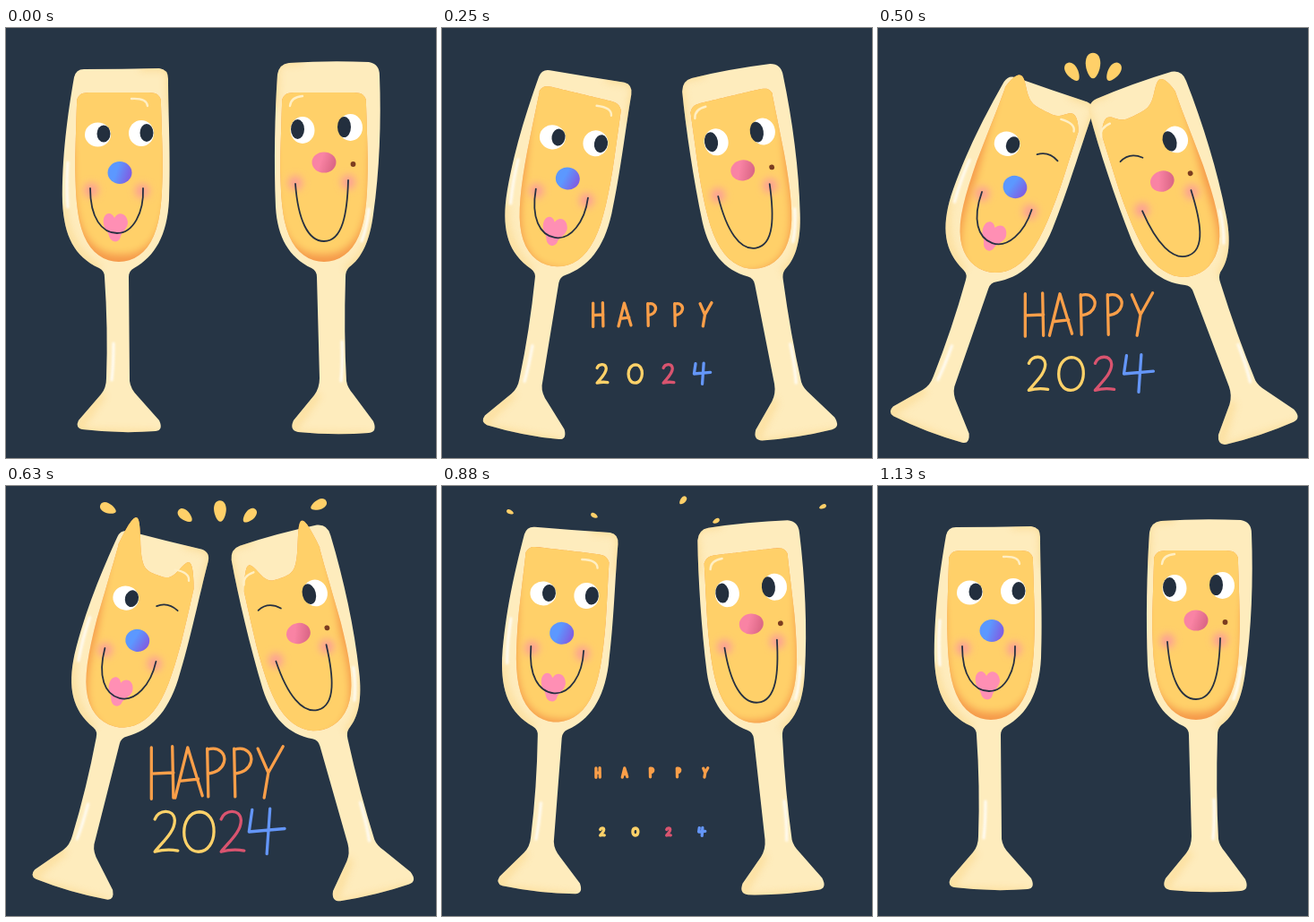
Animation of 480 by 480 pixels, one loop 1260 ms. Source, as an HTML page:

```html
<!DOCTYPE html>
<html lang="en">
<head>
<meta charset="utf-8">
<title>Happy 2024</title>
<style>
  html, body { margin: 0; width: 100%; height: 100%; overflow: hidden; background: #263545; }
  svg { display: block; width: 100vw; height: 100vh; }
  .line { fill: none; stroke: #263041; stroke-width: 1.8; stroke-linecap: round; }
  .shine { fill: none; stroke: #fff; stroke-width: 3; stroke-linecap: round; opacity: .85; }
  .glow { fill: none; stroke: #f9cc70; stroke-width: 8; opacity: .45; }
  .rim { fill: none; stroke: #ffefc4; stroke-width: 2.4; stroke-linecap: round; }
  .glass { fill: #feecbd; }
  .amber { fill: #f5994a; }
  .liquid, .drop { fill: #ffd069; }
  .dark { fill: #232f3e; }
  .white { fill: #fff; }
  .cheek { fill: #fb8fa5; opacity: .75; }
  #lettering path { fill: none; stroke-linecap: round; stroke-linejoin: round; }
</style>
</head>
<body>
<svg viewBox="0 0 480 480" role="img" aria-label="Two champagne glasses clink: Happy 2024">
  <defs>
    <filter id="soft" x="-50%" y="-50%" width="200%" height="200%"><feGaussianBlur stdDeviation="4"/></filter>
    <filter id="fine" x="-300%" y="-20%" width="700%" height="140%"><feGaussianBlur stdDeviation=".9"/></filter>
    <linearGradient id="blue" y2=".3">
      <stop offset=".45" stop-color="#5c98ff"/><stop offset="1" stop-color="#7d62e4"/>
    </linearGradient>
    <linearGradient id="pink" y2=".3">
      <stop offset=".45" stop-color="#f983a4"/><stop offset="1" stop-color="#dd6887"/>
    </linearGradient>
    <clipPath id="bowlL"><path id="clipL"/></clipPath>
    <clipPath id="bowlR"><path id="clipR"/></clipPath>
    <path id="outlineL" d="M87 46 Q130 46 171 45 Q181 46 181 57 C181 95 184 145 182 192 C180 232 166 255 143 268
      Q137 271 137 278 L138 394 Q139 403 147 411 L171 438 Q176 449 167 450 Q126 453 85 448 Q77 446 81 438
      L106 409 Q112 402 112 391 Q114 335 110 278 Q110 271 104 268 C76 255 65 232 63 195 C62 145 69 95 76 55 Q78 46 87 46Z"/>
    <path id="outlineR" d="M316 39 Q360 36 405 38 Q417 40 417 53 C419 105 417 160 410 208 C406 238 397 257 383 267
      Q379 271 379 278 Q377 340 380 394 Q381 401 387 408 L410 439 Q415 451 405 452 Q366 455 326 451 Q316 449 321 438
      L344 410 Q350 402 350 391 L347 278 Q347 271 341 268 C316 256 303 234 301 200 C299 150 300 95 303 52 Q305 40 316 39Z"/>
    <clipPath id="bodyL"><use href="#outlineL"/></clipPath>
    <clipPath id="bodyR"><use href="#outlineR"/></clipPath>
  </defs>

  <g id="glassL">
    <use href="#outlineL" class="glass"/>
    <g clip-path="url(#bodyL)">
      <path class="glow" filter="url(#soft)" d="M150 44 L183 44 L184 90 M62 200 Q68 245 104 270 M78 450 L108 408 M80 452 L170 454"/>
    </g>
    <path class="shine" filter="url(#fine)" d="M69 150 Q67 175 69 200 M120 352 Q120 375 118 393"/>
    <path id="amberL" class="amber"/>
    <g clip-path="url(#bowlL)"><path id="lightL" class="liquid" filter="url(#soft)"/></g>
    <path id="rimL" class="rim" d="M140 79 Q157 78 158 87"/>
    <ellipse class="white" cx="102.5" cy="119" rx="14.5" ry="13.5"/>
    <ellipse class="dark" cx="109" cy="118" rx="7.5" ry="9.5"/>
    <g id="openL">
      <ellipse class="white" cx="151" cy="117.5" rx="14" ry="14.5"/>
      <ellipse class="dark" cx="157" cy="117" rx="7.5" ry="10"/>
    </g>
    <path id="winkL" class="line" d="M138 119 Q149 111 162 118"/>
    <g filter="url(#soft)">
      <circle class="cheek" cx="95" cy="181" r="8"/><circle class="cheek" cx="152" cy="182" r="8"/>
    </g>
    <ellipse cx="127" cy="161.5" rx="13.5" ry="12.5" fill="url(#blue)"/>
    <path fill="#ff8fb4" d="M109 219 C107 207 117 203 121 212 C125 204 135 206 136 217 C136 223 131 226 128 232 C127 241 117 240 115 232 C114 227 110 225 109 219Z"/>
    <path class="line" d="M94 179 C94 212 107 229 124 229 C142 229 154 206 153 179"/>
  </g>

  <g id="glassR">
    <use href="#outlineR" class="glass"/>
    <g clip-path="url(#bodyR)">
      <path class="glow" filter="url(#soft)" d="M300 90 L301 38 L330 36 M412 215 Q405 255 380 270 M318 450 L348 408 M322 455 L408 456"/>
    </g>
    <path class="shine" filter="url(#fine)" d="M405 202 Q403 222 397 238 M375 350 Q376 375 374 394"/>
    <path id="amberR" class="amber"/>
    <g clip-path="url(#bowlR)"><path id="lightR" class="liquid" filter="url(#soft)"/></g>
    <path id="rimR" class="rim" d="M317 87 Q318 77 331 76"/>
    <g id="openR">
      <ellipse class="white" cx="331" cy="114" rx="13.5" ry="15"/>
      <ellipse class="dark" cx="325.5" cy="113" rx="7.5" ry="11"/>
    </g>
    <path id="winkR" class="line" d="M318 114 Q331 107 343 118"/>
    <ellipse class="white" cx="384.5" cy="111" rx="13.5" ry="15"/>
    <ellipse class="dark" cx="377.5" cy="110.5" rx="7.5" ry="11.5"/>
    <g filter="url(#soft)">
      <circle class="cheek" cx="323" cy="173" r="8"/><circle class="cheek" cx="382" cy="172" r="8"/>
    </g>
    <ellipse cx="355" cy="150" rx="13.5" ry="11.5" fill="url(#pink)"/>
    <circle cx="387.5" cy="152" r="2.9" fill="#7b3d20"/>
    <path class="line" d="M323 174 C326 214 337 238 355 238 C376 238 381 206 382 170"/>
  </g>

  <g id="lettering"></g>
  <g id="drops"></g>
</svg>
<script>
const LOOP = 1260, STEP = 125, CLINK = 4, SPLASH = 5;
const $ = id => document.getElementById(id);
const svgPath = (attrs, parent) => {
  const el = document.createElementNS('http://www.w3.org/2000/svg', 'path');
  for (const key in attrs) el.setAttribute(key, attrs[key]);
  return parent.appendChild(el);
};
const show = (el, on) => { el.style.display = on ? '' : 'none'; };
const range = (from, to, count) => Array.from({ length: count + 1 }, (_, i) => from + (to - from) * i / count);
const polygon = pts => 'M' + pts.map(p => p.map(n => n.toFixed(1))).join('L') + 'Z';
const hump = (u, centre, width) => Math.exp(-(((u - centre) / width) ** 2));

// "out" points to the side of the bowl away from the other glass
const glasses = {
  L: { out: -1, mid: 126, pivot: [123, 270], drift: [-2.55, 2.1], turn: 4.9 },
  R: { out: 1, mid: 355, pivot: [363, 272], drift: [.5, 2.9], turn: -4.8 }
};
const TOP = 72, BOTTOM = 261;

function halfWidth(y) {
  const v = Math.max(0, (y - TOP) / (BOTTOM - TOP));
  return 49 * (.95 + .05 * Math.min(1, v * 2.5)) * Math.sqrt(Math.max(0, 1 - v ** 6));
}

// Both walls of the bowl, down the inner one and up the outer one
function walls({ out, mid }, innerTop, outerTop, flare = () => 0) {
  return range(1, -1, 40).map(t => {
    const top = t > 0 ? innerTop : outerTop;
    const y = top + (BOTTOM - top) * (1 - t * t);
    return [mid - out * Math.sign(t) * (halfWidth(y) + flare(y)), y];
  });
}

// Surface runs from the outer wall (u = 0) to the inner wall (u = 1)
function liquid(glass, lean, slosh) {
  const level = TOP - 3 * lean + 22 * slosh;
  const height = u => level - 3 * lean * (.5 - u)
    - 53 * slosh * hump(u, .13, .15) - 26 * slosh * hump(u, .87, .12)
    + 8 * Math.abs(2 * u - 1) ** 14;
  const surface = range(0, 1, 50).map(u => [glass.mid + glass.out * 47 * (1 - 2 * u), height(u)]);
  return polygon([...surface, ...walls(glass, height(1), height(0))]);
}

for (const side in glasses) {
  const flare = y => 4 + Math.max(0, 150 - y) * .12;
  $('light' + side).setAttribute('d', polygon(walls(glasses[side], -40, -40, flare)));
}

function drawGlass(side, lean, slosh, wink) {
  const glass = glasses[side], { out, turn, pivot: [px, py], drift: [dx, dy] } = glass;
  $('glass' + side).setAttribute('transform',
    `translate(${px + dx * lean} ${py + dy * lean}) rotate(${turn * lean}) translate(${-px} ${-py})`);
  const d = liquid(glass, lean, slosh);
  $('amber' + side).setAttribute('d', d);
  $('clip' + side).setAttribute('d', d);
  $('light' + side).setAttribute('transform', `translate(${-out * (2 + 1.8 * lean)} ${5 * lean - 8})`);
  $('rim' + side).setAttribute('transform', `translate(${-out * 2.5 * lean} ${-1.5 * lean})`);
  show($('open' + side), !wink);
  show($('wink' + side), wink);
}

// Hand lettering, each letter drawn around its own centre
const strokes = {
  H: 'M-10 -24 L-10 25 M10 -25 L11 24 M-10 1 L11 0',
  A: 'M-13 24 L-1 -24 L13 22 M-9 8 L9 6',
  P: 'M-8 -23 L-7 23 M-8 -22 C4 -26 10 -17 8 -10 C6 -3 0 0 -7 1',
  Y: 'M-11 -23 L-1 0 M13 -25 L-1 0 L-5 24',
  2: 'M-11 -12 C-8 -21 7 -23 8 -11 C8 0 -3 9 -11 19 Q0 16 11 18',
  0: 'M0 -19 C-20 -18 -19 19 -1 19 C18 19 19 -19 0 -19Z',
  4: 'M-13 -21 L-16 0 L18 -3 M4 -22 L1 21'
};
const orange = '#fb9f49', yellow = '#ffd269', red = '#d9546f', blue = '#6496f8';
const place = (text, x, gap, y, colour) => [...text].map((char, i) => ({
  x: x + gap * i, y, el: svgPath({ d: strokes[char], stroke: colour(i) }, $('lettering'))
}));
const letters = [
  ...place('HAPPY', 174, 30, 320, () => orange),
  ...place('2024', 179, 37, 386, i => [yellow, yellow, red, blue][i])
];

function drawLettering(step) {
  const scale = step <= SPLASH ? 1.17 * (step / SPLASH) ** .85 : 1.17 - .48 * (step - SPLASH);
  show($('lettering'), scale > 0);
  if (scale <= 0) return;
  for (const { x, y, el } of letters) {
    el.setAttribute('transform', `translate(${x} ${y}) scale(${scale})`);
    el.setAttribute('stroke-width', 3.3 / scale);
  }
}

// Place at the splash and drift per step
const egg = 'M0 -.5 C.35 -.5 .5 -.3 .5 -.1 C.5 .15 .25 .5 0 .5 C-.25 .5 -.5 .15 -.5 -.1 C-.5 -.3 -.35 -.5 0 -.5Z';
const drops = [
  [114, 25, -19, 2], [200, 33, -15, 0], [239, 28, 15, -6], [272, 33, 17, 3], [349, 21, 38, 1]
].map(([x, y, vx, vy]) => ({ x, y, vx, vy, el: svgPath({ d: egg, class: 'drop' }, $('drops')) }));

function drawDrops(step) {
  const age = step - SPLASH;
  drops.forEach(({ x, y, vx, vy, el }, i) => {
    const fromCentre = i - 2, burst = step === CLINK && Math.abs(fromCentre) < 2;
    const visible = burst || (age >= 0 && age < 4);
    show(el, visible);
    if (!visible) return;
    const px = burst ? 240 + 23 * fromCentre : x + vx * age;
    const py = burst ? 42 + 7 * Math.abs(fromCentre) : y + vy * age;
    const size = (burst ? 1.2 : 1 - .28 * age) * (fromCentre ? 1 : 1.25);
    const turn = 65 * Math.tanh((px - 240) / 40);
    el.setAttribute('transform', `translate(${px} ${py}) rotate(${turn}) scale(${11 * size} ${19 * size})`);
  });
}

function draw(step) {
  const lean = Math.max(0, CLINK - Math.abs(step - CLINK));
  const slosh = Math.max(0, 1 - .55 * Math.abs(step - SPLASH));
  const wink = step === CLINK || step === SPLASH;
  for (const side in glasses) drawGlass(side, lean, slosh, wink);
  drawLettering(step);
  drawDrops(step);
}

let shown;
const start = performance.now();
function tick() {
  const t = (performance.now() - start) % LOOP;
  // Poses change on whole hundredths of a second
  const step = Math.floor(Math.floor(t / 10) * 10 / STEP);
  if (step !== shown) draw(shown = step);
  requestAnimationFrame(tick);
}
tick();
</script>
</body>
</html>
```
